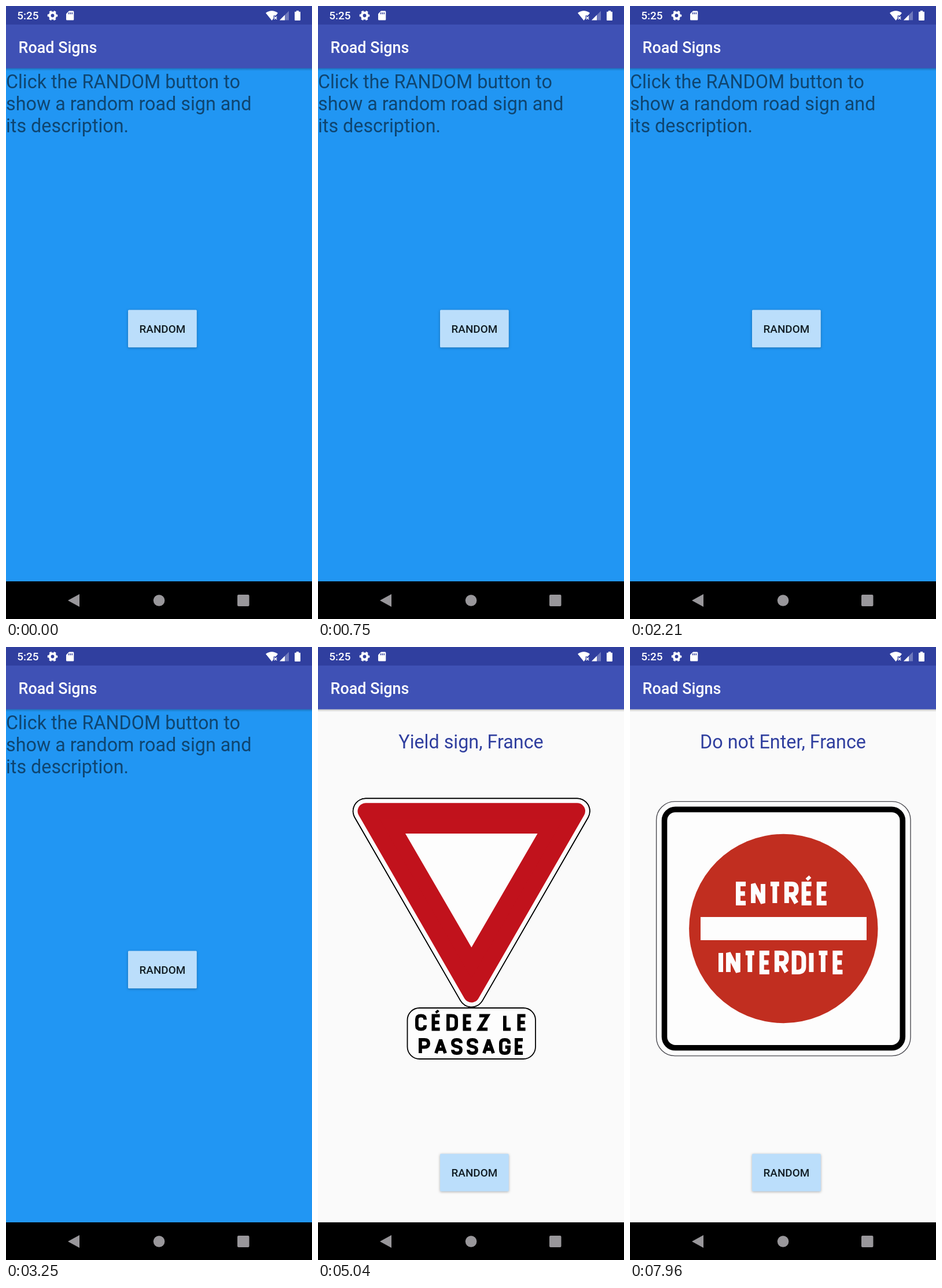
An HTML page that plays this animation: 529x1058 px, repeating every 8 s.

```html
<!DOCTYPE html>
<html lang="en">
<head>
<meta charset="utf-8">
<title>Road Signs</title>
<style>
  html, body { margin: 0; width: 100%; height: 100%; overflow: hidden; background: #000; }
  svg { display: block; width: 529px; height: 1058px; }
  text { font-family: Roboto, sans-serif; }
  .medium { font-weight: 500; }
  .body { font-size: 32.3px; }
  .label { font-size: 32.3px; fill: #303f9f; text-anchor: middle; }
  .button rect { fill: #bbdefb; filter: drop-shadow(0 1.5px 2px rgba(0, 0, 0, .3)); }
  .button text { font-size: 18.86px; fill: #111d24; text-anchor: middle; }
  .letters path { fill: none; vector-effect: non-scaling-stroke; stroke-miterlimit: 2.5; }
</style>
</head>
<body>
<svg viewBox="0 0 529 1058">
  <defs>
    <linearGradient id="shade" x2="0" y2="1">
      <stop stop-opacity=".24"/>
      <stop offset="1" stop-opacity="0"/>
    </linearGradient>
  </defs>

  <rect id="page" y="107" width="529" height="886" fill="#2196f3"/>

  <g id="intro" class="body" fill="#0f4570">
    <text y="142">Click the RANDOM button to</text>
    <text y="180">show a random road sign and</text>
    <text y="217.5">its description.</text>
  </g>

  <g id="yield" visibility="hidden">
    <text class="label" x="264.5" y="174.5">Yield sign, France</text>
    <g stroke-linejoin="round">
      <path id="tri" d="M82.5 283.3H448L265.3 599.5Z" stroke="#000" stroke-width="45.4"/>
      <use href="#tri"/>
      <path d="M82.5 283.3H448L265.3 599.5Z" fill="#fdfdfd" stroke="#fdfdfd" stroke-width="42"/>
      <path d="M82.5 283.3H448L265.3 599.5Z" fill="#c1121c" stroke="#c1121c" stroke-width="28"/>
    </g>
    <path d="M151 322H379.5L265.3 518.5Z" fill="#fdfdfd"/>
    <rect x="154.5" y="623" width="221.5" height="88" rx="21" fill="#fdfdfd" stroke="#000" stroke-width="1.8"/>
    <g id="plate" class="letters" stroke="#000" role="img" aria-label="CÉDEZ LE PASSAGE"></g>
  </g>

  <g id="enter" visibility="hidden">
    <text class="label" x="264.5" y="174.5">Do not Enter, France</text>
    <rect x="45.6" y="266.6" width="439.4" height="439" rx="32" fill="#fdfdfd" stroke="#4a4a50" stroke-width="1.4"/>
    <rect x="59.5" y="280.4" width="411.8" height="411.4" rx="19" fill="#fdfdfd" stroke="#000" stroke-width="9.6"/>
    <circle cx="265.3" cy="486" r="163.2" fill="#c12e20"/>
    <path d="M122 466H409V506H122Z" fill="#fdfdfd"/>
    <g id="disc" class="letters" stroke="#fdfdfd" role="img" aria-label="ENTRÉE INTERDITE"></g>
  </g>

  <g id="button" class="button">
    <rect x="211" y="524.5" width="118.8" height="64.7" rx="1.5"/>
    <text class="medium" x="270.4" y="564">RANDOM</text>
  </g>

  <rect y="107" width="529" height="5" fill="url(#shade)"/>
  <rect width="529" height="32" fill="#303f9f"/>
  <rect y="32" width="529" height="75.5" fill="#3f51b5"/>
  <text class="medium" x="21.6" y="81" font-size="26.9" fill="#fff">Road Signs</text>

  <g fill="#fff">
    <text class="medium" x="19.2" y="23.2" font-size="18.86">5:25</text>
    <g fill="none" stroke="#fff">
      <circle cx="80.5" cy="16.5" r="4.9" stroke-width="4"/>
      <circle cx="80.5" cy="16.5" r="7.4" stroke-width="2.8" stroke-dasharray="3.87" stroke-dashoffset="1.9"/>
    </g>
    <path d="M109 8.5H116Q117.3 8.5 117.3 10V23Q117.3 24.5 116 24.5H105.5Q104 24.5 104 23V13.5Z"/>
    <path d="M108.6 11v3.2M111.5 11v3.2M114.4 11v3.2" stroke="#303f9f" stroke-width="1.5"/>
    <path d="M449 12Q459.5 4.5 470 12L466.5 16.4H462.5V21.5L459.5 25Z"/>
    <path d="M463.6 18.4l4.6 4.6m0-4.6l-4.6 4.6" stroke="#fff" stroke-width="1.6"/>
    <path d="M473 24.5L489 8.5V24.5Z" opacity=".3"/>
    <path d="M473 24.5L482 15.5V24.5Z"/>
    <path d="M499 10.5Q499 9.7 500 9.7H502V8H506V9.7H508Q509 9.7 509 10.5V24Q509 25 508 25H500Q499 25 499 24Z"/>
  </g>

  <rect y="993" width="529" height="65" fill="#000"/>
  <g fill="#99979b">
    <path d="M107 1026L127 1015V1037Z"/>
    <circle cx="264.6" cy="1026" r="9.8"/>
    <rect x="400" y="1016" width="20.5" height="20" rx="2"/>
  </g>
</svg>

<script>
const LOOP = 8000, YIELD_AT = 4710, ENTER_AT = 7790;
const $ = id => document.getElementById(id);

// Sign lettering: centre lines in a 10 by 20 box.
const P = "M0 20V0H5Q10 0 10 5.5T5 11H0";
const GLYPHS = {
  A: "M0 20L5 0L10 20M2 14H8",
  C: "M10 6V5Q10 0 5 0T0 5V15Q0 20 5 20T10 15V14",
  D: "M0 0V20H4Q10 20 10 14V6Q10 0 4 0Z",
  E: "M10 0H0V20H10M0 10H9",
  G: "M10 6V5Q10 0 5 0T0 5V15Q0 20 5 20T10 15V11H5.5",
  I: "M0 0V20",
  L: "M0 0V20H10",
  N: "M0 20V0L10 20V0",
  P: P,
  R: P + "M5 11L10 20",
  S: "M10 5Q10 0 5 0Q0 0 0 5Q0 9 5 10Q10 11 10 15Q10 20 5 20Q0 20 0 15",
  T: "M0 0H10M5 0V20",
  Z: "M0 0H10L0 20H10"
};
const WIDTHS = { A: 22, E: 17, L: 16, T: 18.5, " ": 7 };

function letter(box, d, x, y, w, h, weight) {
  const path = document.createElementNS(box.namespaceURI, "path");
  path.setAttribute("d", d);
  path.setAttribute("transform", `translate(${x} ${y}) scale(${w / 10} ${h / 20})`);
  path.setAttribute("stroke-width", weight);
  box.append(path);
}

function word(box, text, x, top, height, weight, gap, scale) {
  for (const char of text) {
    const key = char === "É" ? "E" : char;
    const width = key === "I" ? weight : (WIDTHS[key] || 20) * scale;
    const left = x + weight / 2, y = top + weight / 2;
    const w = Math.max(width - weight, 1), h = height - weight;
    if (GLYPHS[key]) letter(box, GLYPHS[key], left, y, w, h, weight);
    if (char === "É") letter(box, "M0 20L10 0", x + width * .42, top - height * .21, width * .28, height * .13, weight * .72);
    x += width + gap;
  }
}

word($("plate"), "CÉDEZ LE", 168, 633.5, 29, 5.8, 8.5, 1);
word($("plate"), "PASSAGE", 174, 675, 29, 5.8, 7, 1);
word($("disc"), "ENTRÉE", 183, 405, 41, 8, 5, 1.24);
word($("disc"), "INTERDITE", 153, 524, 41, 8, 5, 1.24);

const show = (id, on) => $(id).setAttribute("visibility", on ? "visible" : "hidden");

function draw(now) {
  const t = now % LOOP;
  const started = t >= YIELD_AT, entered = t >= ENTER_AT;
  $("page").setAttribute("fill", started ? "#fafafa" : "#2196f3");
  $("button").setAttribute("transform", `translate(0 ${started ? 350.3 : 0})`);
  show("intro", !started);
  show("yield", started && !entered);
  show("enter", entered);
  requestAnimationFrame(draw);
}
draw(performance.now());
</script>
</body>
</html>
```
